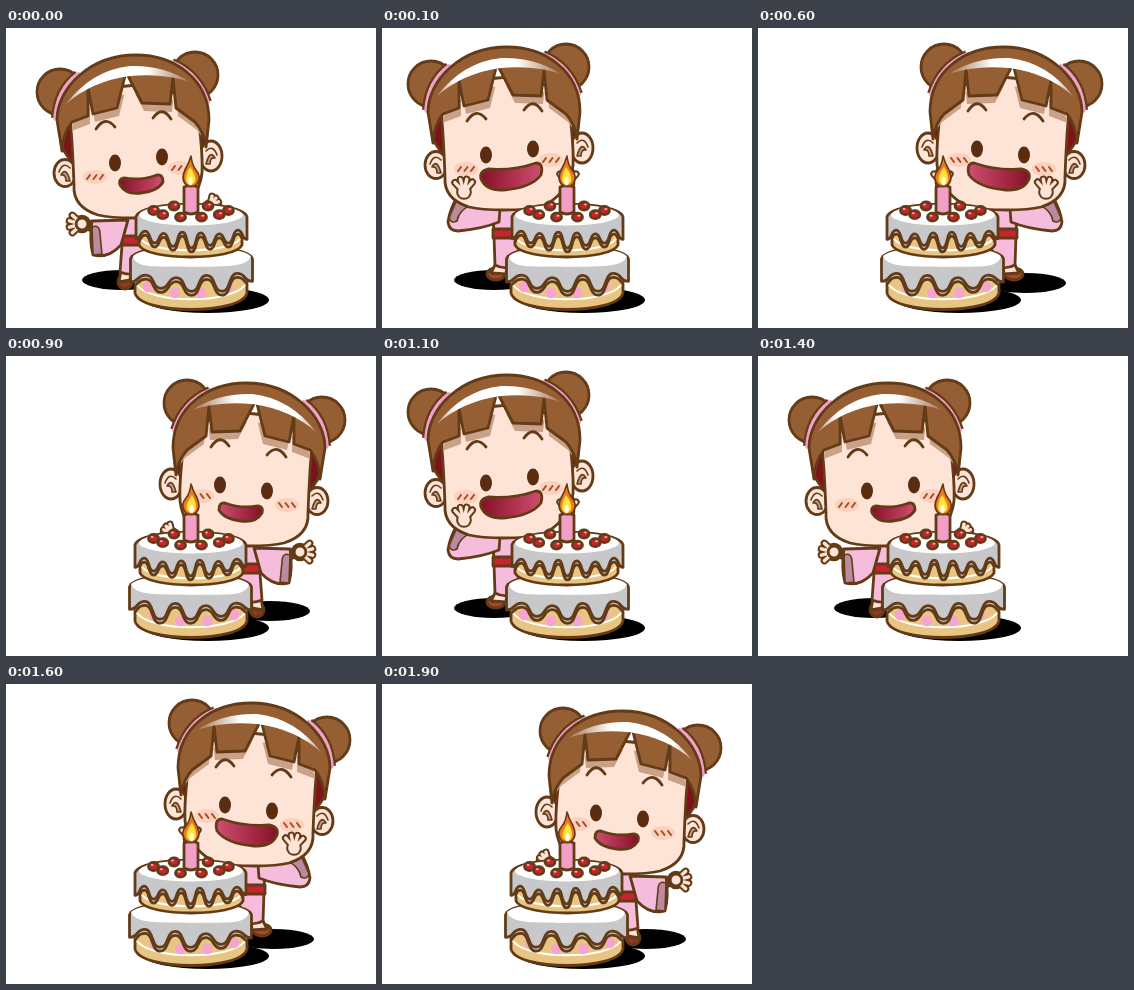
Recreate the animation shown at these times as an HTML page. Size 370x300 px, loop 2000 ms.

```html
<!DOCTYPE html>
<html lang="en">
<head>
<meta charset="utf-8">
<title>Birthday cake</title>
<style>
html, body { margin: 0; width: 100%; height: 100%; overflow: hidden; background: #fff; }
svg { display: block; width: 370px; height: 300px; }
.o { stroke: #633b17; stroke-width: 2.8; stroke-linejoin: round; stroke-linecap: round; }
.thin { stroke-width: 1.6; }
.skin { fill: #fde4d6; }
.hair { fill: #955e33; }
.pink { fill: #f5bddb; }
.red { fill: #c8232f; }
.hem { fill: #b98aa0; }
.line { fill: none; }
.tan { fill: #e8c583; }
.ice { fill: #c8c7c9; }
.drop { fill: #b98544; }
.stripe { fill: none; stroke: #fff; stroke-width: 2; }
</style>
</head>
<body>
<svg viewBox="0 0 370 300">
  <defs>
    <linearGradient id="lips"><stop offset="0" stop-color="#cf4f70"/><stop offset="1" stop-color="#861027"/></linearGradient>
    <linearGradient id="shine"><stop offset="0" stop-color="#fff" stop-opacity=".15"/><stop offset=".35" stop-color="#fff"/><stop offset=".85" stop-color="#fff"/><stop offset="1" stop-color="#fff" stop-opacity=".4"/></linearGradient>
    <path id="face" d="M178 85C176 105 173 125 174 145C176 165 190 180 206 187C225 191 262 191 278 187C294 182 303 172 302 157C303 130 304 110 306 90C286 50 204 45 178 85Z"/>
    <path id="fringe" d="M167 92C167 50 203 27 240 27C286 27 319 60 319 92L314 123Q313 105 304 94L288 88V60L283 86L259 80L250 44L234 75L206 76L203 50L200 80L181 94Q172 104 170 119Z"/>
    <path id="lowTier" d="M129 235V265C134 287 236 287 241 265V235Z"/>
    <path id="topTier" d="M134 195V217C141 233 230 233 237 217V195Z"/>
    <clipPath id="faceClip"><use href="#face"/></clipPath>
    <clipPath id="lowClip"><use href="#lowTier"/></clipPath>
    <clipPath id="topClip"><use href="#topTier"/></clipPath>
  </defs>

  <ellipse id="shade" rx="40" ry="10"/>
  <ellipse cx="201" cy="272" rx="62" ry="13"/>

  <g id="scene">
    <g id="bodyMild" class="mild o">
      <ellipse cx="251" cy="254" rx="7" ry="7" fill="#8c3a22"/>
      <path class="skin" d="M245 242H255L257 254L246 252Z"/>
      <path class="pink" d="M228 186L252 190L256 244Q248 248 235 245Z"/>
      <path class="red" d="M232 208H254V217H232Z"/>
      <path class="skin" d="M276 195L291 193V201L276 205Z"/>
      <path class="pink" d="M248 192L284 193Q287 212 283 227Q268 231 255 217Z"/>
      <path class="hem thin" d="M284 199Q276 196 276 206L274 226L283 227Z"/>
    </g>
    <g id="bodyWide" class="wide o">
      <ellipse cx="256" cy="246" rx="9" ry="6" fill="#a8462e"/>
      <path class="skin" d="M245 235H256L261 245L246 246Z"/>
      <path class="pink" d="M230 176L259 180L257 237Q248 242 235 238Z"/>
      <path class="red" d="M232 201H259V210H232Z"/>
      <path class="pink" d="M252 181Q277 179 294 168Q302 180 304 194Q303 203 294 203Q270 201 253 194Z"/>
      <path class="hem thin" d="M281 177Q290 170 294 169L303 190Q301 196 295 193Q293 182 281 177Z"/>
    </g>

    <g id="head">
      <g class="o">
        <circle class="hair" cx="181" cy="47" r="23"/>
        <circle class="hair" cx="316" cy="64" r="23"/>
        <g id="bands" class="line"></g>
        <path fill="#7f1219" d="M168 88L170 120L180 135H304L314 120L318 88Z"/>
        <g id="ears"></g>
        <use href="#face" class="skin"/>
      </g>
      <use href="#fringe" fill="#c9a088" x="-2" y="8" clip-path="url(#faceClip)"/>
      <use href="#fringe" class="o hair"/>
      <path fill="url(#shine)" d="M186 54Q212 37 246 38Q284 42 310 76Q284 53 246 48Q212 45 186 54Z"/>
      <path class="o line" d="M205 91Q214 77 223 90M261 99Q271 87 280 101"/>
      <g fill="#5b2d10">
        <ellipse cx="214" cy="129" rx="6" ry="8.4"/>
        <ellipse cx="261" cy="135" rx="6" ry="8.4"/>
      </g>
      <g id="cheeks"></g>
      <path class="mild o" fill="url(#lips)" d="M219 147Q235 153 252 150Q258 151 256 157Q250 167 235 165Q218 163 213 154Q213 146 219 147Z"/>
      <path class="wide o" fill="url(#lips)" d="M211 143Q234 151 259 149Q268 151 266 159Q261 171 243 170Q216 168 206 155Q203 143 211 143Z"/>
    </g>
    <g id="hands"></g>

    <g id="cake">
      <use href="#lowTier" class="o tan"/>
      <path class="stripe" d="M131 257C145 276 225 276 239 257"/>
      <g id="dots" fill="#f6a3cd"></g>
      <use href="#lowIce" class="drop" y="4" clip-path="url(#lowClip)"/>
      <path id="lowIce" class="o ice"/>
      <path fill="#fff" d="M125 229C128 216 240 216 243 229C239 241 219 238 185 239C151 238 132 240 125 229Z"/>
      <use href="#topTier" class="o tan"/>
      <path class="stripe" d="M136 211C147 226 225 226 235 211"/>
      <use href="#topIce" class="drop" y="4" clip-path="url(#topClip)"/>
      <path id="topIce" class="o ice"/>
      <ellipse cx="185" cy="187" rx="52" ry="10.5" fill="#fff"/>
      <g id="cherries"></g>
      <path class="o" fill="#f19fc7" d="M178 159V184Q185 188 192 184V159Q185 156 178 159Z"/>
      <path class="o thin" fill="#ee7a1c" d="M185 128Q187 135 191 142Q196 153 188 158Q183 160 179 156Q174 149 180 142Q184 137 185 128Z"/>
      <path fill="#ffe23b" d="M186 139Q192 149 189 155Q185 159 181 154Q179 148 186 139Z"/>
      <ellipse cx="185.5" cy="153" rx="2.2" ry="4" fill="#fffbe0"/>
    </g>
  </g>
</svg>
<script>
const $ = id => document.getElementById(id);
const rad = deg => deg * Math.PI / 180;
const repeat = (n, make) => Array.from({ length: n }, (_, i) => make(i)).join('');

// A domed top whose lower edge alternates between drips and gaps along an arc.
function icing(id, rx, top, base, sag, depth, drips) {
  const cx = 184.5, n = 2 * (drips - 1);
  let x = cx + rx, y = top;
  let d = `M${cx - rx} ${top}C${cx - rx + 4} ${top - 17} ${x - 4} ${top - 17} ${x} ${top}`;
  for (let k = 0; k <= n; k++) {
    const u = 1 - 2 * k / n;
    const nx = cx + rx * u;
    const ny = base + sag * Math.sqrt(1 - u * u) + (k % 2 ? -depth : depth) + 1.5 * Math.sin(2.3 * k);
    const lean = 0.6 * (nx - x);
    d += `C${x + lean} ${y} ${nx - lean} ${ny} ${nx} ${ny}`;
    [x, y] = [nx, ny];
  }
  $(id).setAttribute('d', d + 'Z');
}
icing('topIce', 55.5, 189, 204, 8, 6.5, 7);
icing('lowIce', 61, 231, 247, 9, 7, 5);

// Outlined hand: a palm with four fingers fanned around an angle.
function hand(pose, x, y, angle, size) {
  const fingers = repeat(4, i => {
    const a = rad(angle + 28 * (i - 1.5));
    return `M${x} ${y}l${size * Math.cos(a)} ${size * Math.sin(a)}`;
  });
  const layer = (color, grow) =>
    `<path d="${fingers}" stroke="${color}" stroke-width="${3.4 + grow}" stroke-linecap="round"/>
     <circle cx="${x}" cy="${y}" r="${size * 0.45 + grow / 2}" fill="${color}"/>`;
  return `<g class="${pose}">${layer('#633b17', 4)}${layer('#fde4d6', 0)}</g>`;
}
$('hands').innerHTML = hand('mild', 166, 177, 215, 9) + hand('wide', 288, 164, -88, 13) + hand('wide', 184, 155, -90, 12);
$('bodyMild').innerHTML += hand('mild', 294, 196, 0, 13);

function ear(x, y, ry, side) {
  return `<ellipse class="skin" cx="${x}" cy="${y}" rx="11" ry="${ry}"/>
    <path class="thin" fill="#c9a088" d="M${x - 5 * side} ${y + 8}q${4 * side} -15 ${9 * side} -6q${-5 * side} -1 ${-5 * side} 6z"/>
    <path class="thin line" d="M${x - 5 * side} ${y - 5}q${7 * side} -7 ${11 * side} 4"/>`;
}
$('ears').innerHTML = ear(165, 128, 15, -1) + ear(311, 145, 13.5, 1);

const band = d => `<path d="${d}" stroke-width="10" stroke-linecap="butt"/><path d="${d}" stroke="#f3a0c9" stroke-width="5.5"/>`;
$('bands').innerHTML = band('M204 35Q178 46 169 74') + band('M298 47Q318 62 320 90');

const cheek = (x, y) => `<ellipse cx="${x}" cy="${y}" rx="12" ry="7" fill="#fbd0bd"/>` +
  repeat(3, i => `<path class="o" style="stroke:#a04f28;stroke-width:2" d="M${x - 8 + 6.5 * i} ${y - 2}l3 4"/>`);
$('cheeks').innerHTML = cheek(196, 140) + cheek(281, 149);

$('dots').innerHTML = repeat(4, i => {
  const k = i - 1.5;
  return `<circle cx="${188 + 26.7 * k}" cy="${265.8 - 3 * k * k}" r="5.2"/>`;
});

const cherry = (x, y) => `<ellipse class="o red" cx="${x}" cy="${y}" rx="5" ry="4"/>
  <ellipse cx="${x - 1.5}" cy="${y - 1.5}" rx="1.6" ry="1" fill="#f6a5a0"/>`;
$('cherries').innerHTML = cherry(168, 178) + cherry(202, 178) + repeat(6, i => {
  const a = rad(10 + 32 * i);
  return cherry(185 + 38 * Math.cos(a), 181 + 8.5 * Math.sin(a));
});

const show = (name, on) => document.querySelectorAll('.' + name).forEach(e => e.style.display = on ? '' : 'none');
let pose;

// Each second: half facing left, half facing right, with a big smile mid-half.
function draw() {
  const t = performance.now() % 2000;
  const left = t % 1000 < 500;
  const big = t % 500 >= 100 && t % 500 < 400;
  if (pose !== `${left} ${big}`) {
    pose = `${left} ${big}`;
    const shift = big ? 4 : 0;
    $('scene').setAttribute('transform', left ? 'matrix(-1 0 0 1 370 0)' : '');
    $('head').setAttribute('transform', big ? 'translate(5 -8)' : '');
    $('shade').setAttribute('cx', left ? 116 - shift : 264 + shift);
    $('shade').setAttribute('cy', left ? 252 : 255);
    show('mild', !big);
    show('wide', big);
  }
  requestAnimationFrame(draw);
}
draw();
</script>
</body>
</html>
```
